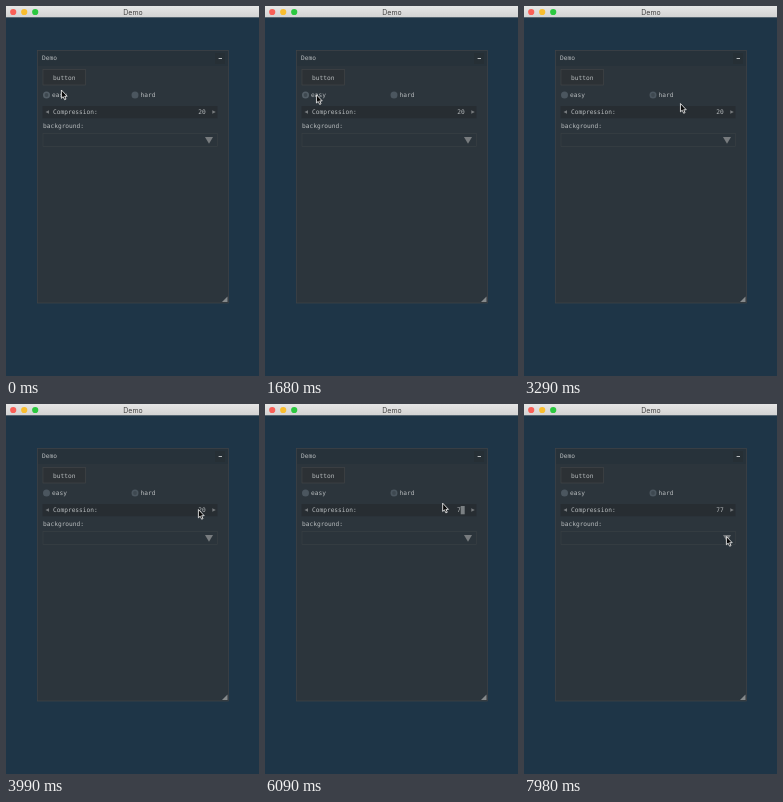
Animation of 253 by 370 pixels, one loop 8000 ms. Source, as an HTML page:

```html
<!DOCTYPE html>
<html lang="en">
<head>
<meta charset="utf-8">
<title>Demo</title>
<style>
html, body { margin: 0; width: 100%; height: 100%; overflow: hidden; background: #1e3547; }
svg { display: block; width: 253px; height: 370px; }
text { font: 6.2px "DejaVu Sans Mono", monospace; fill: #b8bcbe; }
.title { font: 7px Inter, sans-serif; fill: #404040; }
.line { stroke: #414446; stroke-width: .7; }
.faint { stroke: #3b4145; stroke-width: .6; }
.radio { fill: #4b565f; }
.radio.hover { fill: #535e67; }
.arrow { fill: #777b7e; }
</style>
</head>
<body>
<svg viewBox="0 0 253 370">
  <defs>
    <linearGradient id="bar" x2="0" y2="1">
      <stop stop-color="#e6e6e6"/><stop offset="1" stop-color="#d3d3d3"/>
    </linearGradient>
  </defs>
  <rect width="253" height="11.3" fill="url(#bar)"/>
  <circle cx="7.2" cy="6" r="3.1" fill="#f95f57"/>
  <circle cx="18.2" cy="6" r="3.1" fill="#f9bd2e"/>
  <circle cx="29.2" cy="6" r="3.1" fill="#2bc840"/>
  <text class="title" x="127" y="8.9" text-anchor="middle">Demo</text>

  <rect class="line" x="31.5" y="44.5" width="191" height="252.5" fill="#2c353c"/>
  <rect x="32" y="45" width="190" height="15" fill="#27323a"/>
  <text x="36" y="54.4">Demo</text>
  <rect x="209" y="47" width="10" height="11" fill="#262f35"/>
  <rect x="212.6" y="52" width="3.4" height="1" fill="#b8bcbe"/>
  <path d="M221.5 290.5V296H216Z" fill="#85898b"/>

  <rect class="line" x="37" y="63.5" width="42.5" height="15.5" fill="#2c3135"/>
  <text x="58.2" y="73.5" text-anchor="middle">button</text>

  <circle class="radio" cx="40.5" cy="89" r="3.5"/>
  <circle class="radio" cx="129" cy="89" r="3.5"/>
  <circle id="dot" cy="89" r="1.9" fill="#3e4850"/>
  <text x="46" y="91.2">easy</text>
  <text x="134.6" y="91.2">hard</text>

  <rect x="36.5" y="100" width="175" height="12.3" fill="#272d32"/>
  <path class="arrow" d="M39.5 106L43 104.2V107.8ZM209.8 106L206.3 104.2V107.8Z"/>
  <text x="47" y="108.2">Compression:</text>
  <rect id="mark" fill="#7b8083"/>
  <text id="value" y="108.2"></text>

  <text x="37" y="122.2">background:</text>
  <rect class="faint" x="37" y="127.5" width="174.5" height="13" fill="#2b343b"/>
  <path class="arrow" d="M199 131H207L203 137.7Z"/>

  <path id="mouse" d="M.4 .5V8.8L2.2 7.2L3.6 10.2L5 9.6L3.7 6.7H6.2Z"
    fill="#080808" stroke="#fff" stroke-width=".8"/>
</svg>
<script>
const LOOP = 8000, STEP = 70, MOVE = 350, CHAR = 3.73;
const $ = id => document.getElementById(id);
const radios = document.querySelectorAll('.radio');

// Pointer moves: start time and the point reached MOVE ms later
const moves = [
  [0, 42, 88], [560, 131, 90], [1190, 42, 88], [1610, 129, 90], [2240, 127, 88],
  [2660, 130, 90], [3150, 204, 110], [3640, 192, 105], [4060, 202, 106],
  [4620, 178.5, 105], [5950, 175, 87], [6510, 171.3, 116.5], [7000, 194, 130],
  [7630, 202, 132]
];

const ease = k => k * k * (3 - 2 * k);

function pointer(t) {
  let x = 55, y = 83.5;
  for (const [start, toX, toY] of moves) {
    const k = ease(Math.min(1, Math.max(0, (t - start) / MOVE)));
    x += (toX - x) * k;
    y += (toY - y) * k;
  }
  return [x, y];
}

function set(id, attributes) {
  for (const name in attributes) $(id).setAttribute(name, attributes[name]);
}

function draw(now) {
  const t = Math.floor(now % LOOP / STEP) * STEP;
  const [x, y] = pointer(t);
  set('mouse', { transform: `translate(${x} ${y})` });

  const inRow = y > 82 && y < 96;
  radios[0].classList.toggle('hover', inRow && x < 124);
  radios[1].classList.toggle('hover', inRow && x >= 124);
  const hard = t >= 2730 || t >= 1260 && t < 1610;
  set('dot', { cx: hard ? 129 : 40.5 });

  const value = t < 6020 ? '20' : t < 6160 ? '7' : '77';
  const editing = t >= 4200 && t < 7140;
  const selected = editing && t < 6020;
  const end = editing ? 195.7 : 199.7;
  const start = end - value.length * CHAR;
  $('value').textContent = value;
  set('value', { x: start });
  $('value').style.fill = selected ? '#50575b' : '';

  // Selection behind the number, or a block caret after it
  set('mark', selected
    ? { x: start - .7, y: 100, width: end - start + .3, height: 12 }
    : { x: end, y: 102, width: editing ? 4 : 0, height: 8.3 });
  requestAnimationFrame(draw);
}

draw(performance.now());
</script>
</body>
</html>
```
